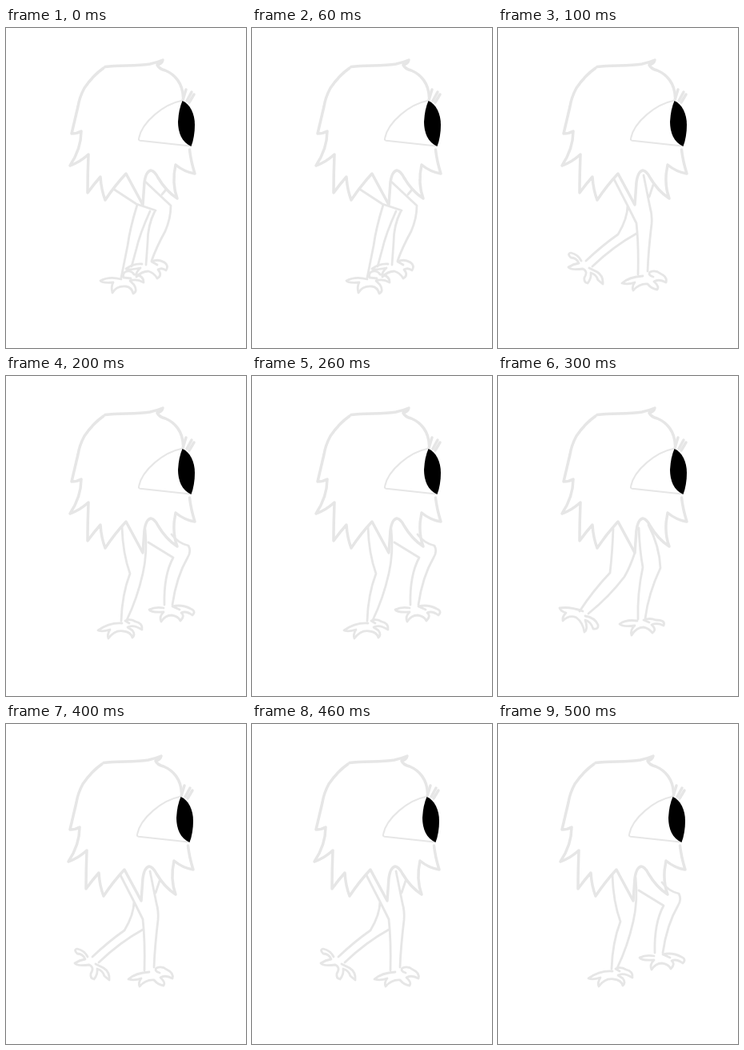
An HTML page that plays this animation: 300x400 px, repeating every 600 ms.

```html
<!DOCTYPE html>
<html lang="en">
<head>
<meta charset="utf-8">
<title>Walking bird</title>
<style>
html, body { margin: 0; width: 100%; height: 100%; overflow: hidden; background: #fff; }
svg { display: block; width: 300px; height: 400px; }
</style>
</head>
<body>
<svg viewBox="0 0 300 400" fill="none" stroke="#e6e6e6" stroke-linecap="round" stroke-linejoin="round">
  <g id="bird">
    <path id="legs" stroke-width="2.8"/>
    <g stroke-width="3.5">
      <path d="M124 48.500C143 46 162 48 180 45Q189 43 196 40Q195 45 189 46Q191 51 199 53C211 58 221 69 221.500 87"/>
      <path d="M122 50Q109 59 98 75Q92 86 90 98L82 132Q89 132 94 129Q94 151 80 172Q92 168 103 158Q102 183 102 206Q110 195 118 186Q119 202 124 215Q136 197 150 182L171 221Q172 207 173 193Q175 179 181 178Q186 179 190 187Q200 204 214 213Q207 194 212 171Q223 180 236 182Q231 166 229.500 152"/>
    </g>
    <path stroke-width="3.500" d="M221 90L225 77M226 91L232 80M229 93L235 83"/>
    <path stroke-width="2" d="M219 91C198 95 170 117 166 138Q165 141 170 141L230 147.500"/>
    <path fill="#000" stroke="none" d="M220.500 91C230 95 236 107 236 121Q236 136 231.500 148C220 143 215 131 215 117Q216 101 220.500 91Z"/>
  </g>
</svg>
<script>
const STEP = 100;

const poses = {
  pass: `M134 201L163 220L187 228M164 221Q155 250 152 272L144 312M180 229Q167 258 163 276L157 298
    M174 192L206 222Q206 238 199 254Q188 274 182 291M186 229Q177 247 177 268L175 296M195 208L200 202
    M144 314Q129 310 118 316Q120 319 134 318Q131 323 133 331Q138 322 150 323Q157 324 159 332Q165 329 160 321L155 316Q163 313 172 318Q172 309 160 308Q157 303 151 304Q145 306 147 312L156 313
    M170 295Q160 294 150 301Q153 303 168 300Q162 305 163 311Q170 304 178 304Q185 306 189 313Q196 309 190 302Q195 299 200 303Q204 297 198 293Q190 288 182 292L189 296`,
  back: `M145 189L162 222L173 244M162 222Q162 238 150 258Q130 272 110 291M173 257Q144 273 118 298
    M173 244Q176 272 175 308M182 184L190 224Q193 234 192 245Q188 278 187 304M194 196L189 211
    M104 291Q100 283 91 281Q86 282 91 287Q98 287 101 294Q94 295 88 299Q91 303 106 301Q113 304 108 312Q107 318 112 319Q117 313 116 306Q123 308 125 315L131 320Q132 310 124 305L114 300
    M181 310Q164 311 155 319Q163 321 171 318Q167 323 169 328Q177 319 187 320Q192 326 199 327Q202 323 195 317Q201 313 210 318Q212 311 203 307Q197 302 190 305Q187 309 194 311`,
  reach: `M145 189Q146 222 155 247Q145 273 144 306M174 192Q177 221 171 247Q164 278 151 305
    M178 208L209 227Q197 249 198 286M207 198Q215 209 228 212Q232 219 227 227Q213 251 208 286
    M145 309Q129 308 115 318Q121 320 130 317Q126 323 128 328Q136 317 147 319Q156 320 158 327Q162 323 158 318L152 314Q159 310 170 317Q171 309 162 307Q155 303 149 306L154 309
    M197 290Q187 288 179 292Q181 296 197 295Q191 301 194 307Q199 299 207 299Q215 300 218 306Q224 300 219 296Q225 293 233 299Q238 294 231 291Q220 285 208 288L217 292`,
  push: `M144 191Q143 220 140 246Q119 268 102 294M171 221Q165 239 158 251Q139 276 113 297
    M176 190Q177 217 181 239Q174 272 175 304M188 186Q202 213 203 240Q188 272 184 303
    M106 294Q90 288 77 290Q78 294 85 296Q80 301 81 306Q89 298 98 302Q106 308 108 320Q113 317 109 305Q116 307 119 316Q126 317 125 311Q121 302 109 300
    M174 306Q160 304 152 310Q156 314 171 312Q165 317 167 324Q173 314 182 314Q188 315 193 321Q199 317 192 311Q199 308 207 312Q210 305 197 305Q190 302 182 305L189 308`
};

// Each step: pose and sideways drift.
const walk = [["pass", 0], ["back", 0], ["reach", 0], ["push", 0], ["back", -2], ["reach", -2]];
const bird = document.getElementById("bird");
const legs = document.getElementById("legs");

function draw(time) {
  const [pose, shift] = walk[Math.floor(time / STEP) % walk.length];
  legs.setAttribute("d", poses[pose]);
  bird.setAttribute("transform", `translate(${shift} 0)`);
}

function tick() {
  draw(performance.now() - start);
  requestAnimationFrame(tick);
}

const start = performance.now();
tick();
</script>
</body>
</html>
```
